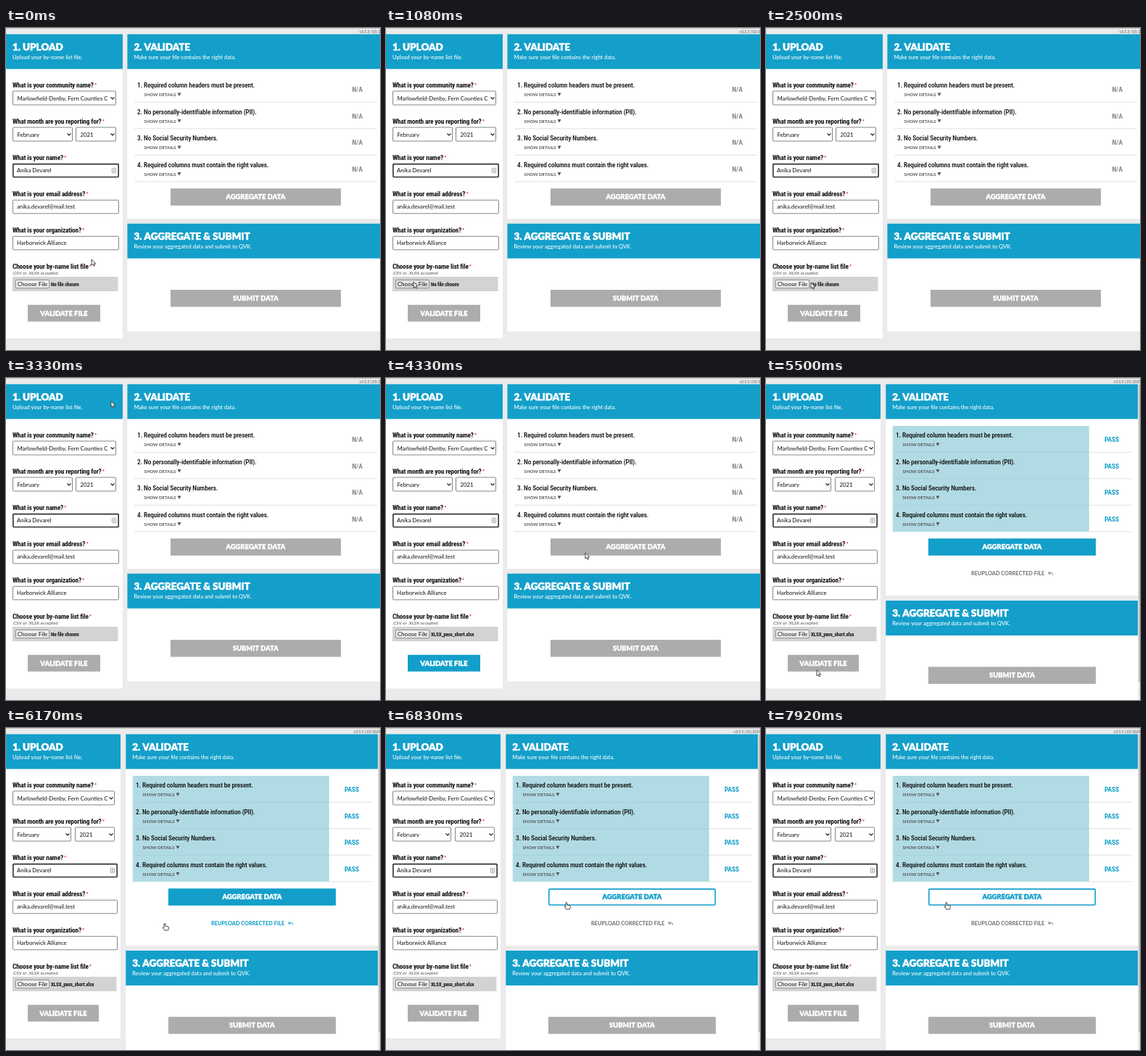
An HTML page with a canvas for the animation above (8000 ms loop, 516x444 px).

```html
<!DOCTYPE html>
<html lang="en">
<head>
<meta charset="utf-8">
<title>Upload and validate</title>
<style>
html, body { margin: 0; width: 516px; height: 444px; overflow: hidden; }
canvas { display: block; }
</style>
</head>
<body>
<canvas id="stage" width="516" height="444"></canvas>
<script>
const ctx = document.getElementById('stage').getContext('2d');
const LOOP = 8000, VALIDATED = 5500, FILE_CHOSEN = 4330, PRESSED = 5080;
const BLUE = '#139fca', GREY = '#abacae', INK = '#111', LINE = '#e0e0e0';
const SANS = 'Lato, sans-serif';
const NARROW = '"Roboto Condensed", "Open Sans Condensed", Roboto, sans-serif';

// Pointer path: time, x, y
const path = [
  [0, 118, 319], [80, 118, 319], [500, 38, 350], [1920, 38, 350],
  [2170, 62, 351], [2580, 62, 351], [3080, 153, 42], [3330, 145, 32],
  [3670, 145, 32], [4170, 275, 241], [4330, 275, 241], [5080, 70, 402.5],
  [5500, 70, 402.5], [6080, 218, 269], [6170, 218, 269], [6500, 248, 240], [LOOP, 248, 240]
];

function pointerAt(t) {
  const i = path.findIndex(key => key[0] > t);
  const [t0, x0, y0] = path[i - 1], [t1, x1, y1] = path[i];
  const p = (t - t0) / (t1 - t0), e = p * p * (3 - 2 * p);
  return { x: x0 + (x1 - x0) * e, y: y0 + (y1 - y0) * e };
}

function rect(x, y, w, h, fill) {
  ctx.fillStyle = fill;
  ctx.fillRect(x, y, w, h);
}

function box(x, y, w, h, stroke, width = 1, radius = 1, fill = '#fff') {
  ctx.beginPath();
  ctx.roundRect(x + width / 2, y + width / 2, w - width, h - width, radius);
  ctx.fillStyle = fill;
  ctx.fill();
  ctx.strokeStyle = stroke;
  ctx.lineWidth = width;
  ctx.stroke();
}

function text(str, x, y, size, { weight = 400, color = INK, family = SANS, align = 'left', spacing = 0 } = {}) {
  ctx.font = `${weight} condensed ${size}px ${family}`;
  ctx.letterSpacing = spacing + 'px';
  ctx.textAlign = align;
  ctx.fillStyle = color;
  ctx.fillText(str, x, y);
  if (weight === 900) { // a thin outline for the heaviest lettering
    ctx.strokeStyle = color;
    ctx.lineWidth = size * 0.04;
    ctx.strokeText(str, x, y);
  }
  return ctx.measureText(str).width;
}

function polyline(points, stroke, width) {
  ctx.beginPath();
  points.forEach(([x, y]) => ctx.lineTo(x, y));
  ctx.strokeStyle = stroke;
  ctx.lineWidth = width;
  ctx.stroke();
}

function panel(x, y, right, bottom, title, subtitle) {
  rect(x, y, right - x, bottom - y, '#fff');
  rect(x, y, right - x, 48, BLUE);
  text(title, x + 9, y + 22.3, 13.4, { weight: 900, color: '#fff' });
  text(subtitle, x + 9, y + 34, 7.5, { weight: 500, color: '#fff' });
}

function label(str, y) {
  const w = text(str, 9, y, 9.4, { weight: 700, family: NARROW, spacing: -0.18 });
  text('*', 10 + w, y, 8, { weight: 700, color: '#e0262d' });
}

function field(str, y, right, focused) {
  box(9, y, right - 9, 19.5, focused ? '#333' : '#858585', focused ? 1.6 : 1);
  text(str, 15, y + 12.5, 7.8);
}

function select(str, x, y, right) {
  box(x, y, right - x, 20, '#858585');
  text(str, x + 6.5, y + 13, 7.8);
  polyline([[right - 7.5, y + 9], [right - 5, y + 11.5], [right - 2.5, y + 9]], '#222', 1.2);
}

function button(str, x, y, w, h, color, outline) {
  if (outline) box(x, y, w, h, outline, 1.6, 1);
  else rect(x, y, w, h, color);
  text(str, x + w / 2, y + h / 2 + 3.4, 9.4, { weight: 900, color: outline ? BLUE : '#fff', align: 'center' });
}

function uploadPanel(t, done, mouse) {
  const shift = done ? -2 : 0;
  const chosen = t >= FILE_CHOSEN - 1;
  panel(0, 8.5, done ? 158 : 161, 428, '1. UPLOAD', 'Upload your by-name list file.');
  label('What is your community name?', 82);
  select('Marlowfield-Denby, Fern Counties C', 9, 86.5, 152 + shift);
  label('What month are you reporting for?', 132);
  select('February', 9, 136.5, 92 + shift);
  select('2021', 96 + shift / 2, 136.5, 152 + shift);
  label('What is your name?', 182);
  field('Anika Devarel', 186.8, 156 + shift, true);
  box(146 + shift, 193, 6, 7, '#888', 0.8);
  polyline([[148 + shift, 195.5], [150 + shift, 195.5]], '#777', 0.8);
  polyline([[148 + shift, 197.5], [150 + shift, 197.5]], '#777', 0.8);
  label('What is your email address?', 232);
  field('anika.devarel@mail.test', 236.8, 156 + shift);
  label('What is your organization?', 282);
  field('Harborwick Alliance', 286.8, 156 + shift);
  label('Choose your by-name list file', 332);
  text('.CSV or .XLSX accepted', 9, 340, 6, { weight: 700, color: '#777' });

  rect(9, 343, 145.5 + shift, 20, '#d3d3d3');
  const onPicker = mouse.x < 60 && mouse.x > 13 && mouse.y > 347 && mouse.y < 359;
  box(13, 347, 47, 12, '#767676', 0.8, 1.5, onPicker ? '#e2e2e2' : '#efefef');
  text('Choose File', 36.5, 355.7, 8.1, { align: 'center' });
  text(chosen ? 'XLSX_pass_short.xlsx' : 'No file chosen', 62, 355.5, 7, { weight: 700, family: NARROW, spacing: -0.12 });

  const active = chosen && !done;
  const over = mouse.x > 30 && mouse.x < 130 && mouse.y > 382 && mouse.y < 405;
  const outline = active && over && (t >= PRESSED ? '#17364f' : BLUE);
  button('VALIDATE FILE', 30, 381.7, 100 + shift, 23, active ? BLUE : GREY, outline);
}

function validatePanel(done, mouse) {
  const left = done ? 165.3 : 167.4, right = done ? 513 : 516, x = left + 9.5;
  panel(left, 8.5, right, done ? 300 : 263, '2. VALIDATE', 'Make sure your file contains the right data.');
  if (done) rect(x, 66, 271, 146, '#b1dbe4');
  [
    'Required column headers must be present.',
    'No personally-identifiable information (PII).',
    'No Social Security Numbers.',
    'Required columns must contain the right values.'
  ].forEach((rule, i) => {
    const y = 66 + i * 36.5;
    text(`${i + 1}. ${rule}`, x + 4.2, y + 16, 9.4, { weight: 500, family: NARROW, spacing: -0.17 });
    const w = text('SHOW DETAILS', x + 13.7, y + 28, 6, { weight: 700, color: '#555' });
    const tip = x + 15.7 + w;
    ctx.beginPath();
    ctx.moveTo(tip, y + 23.5);
    ctx.lineTo(tip + 5, y + 23.5);
    ctx.lineTo(tip + 2.5, y + 28);
    ctx.fill();
    text(done ? 'PASS' : 'N/A', done ? 477 : 484.8, y + 22, 9.4,
      { weight: 700, color: done ? BLUE : '#858585', family: NARROW, align: 'center' });
    const edge = done ? x + 271 : x;
    rect(edge, y + 35.8, (done ? 505 : 512) - edge, 1, LINE);
    if (done && i < 3) rect(x, y + 35.8, 271, 1, '#a6d0da');
  });

  const bx = done ? 224 : 227, bw = done ? 231 : 235;
  const over = done && mouse.x > bx && mouse.y > 221 && mouse.y < 245;
  button('AGGREGATE DATA', bx, 221.3, bw, 23.5, done ? BLUE : GREY, over && BLUE);
  if (!done) return;

  const onLink = mouse.x > 215 && mouse.y > 260 && mouse.y < 280;
  const color = onLink ? BLUE : '#777';
  text('REUPLOAD CORRECTED FILE', 283, 272, 7.4, { weight: 800, color });
  ctx.beginPath();
  ctx.moveTo(390, 269.5);
  ctx.quadraticCurveTo(395, 266, 395.5, 271.5);
  ctx.strokeStyle = color;
  ctx.lineWidth = 1;
  ctx.stroke();
  polyline([[390.5, 267], [390, 269.8], [393, 270]], color, 1);
}

function submitPanel(done) {
  const y = done ? 307 : 269.7;
  panel(done ? 165.3 : 167.4, y, done ? 513 : 516, done ? 444 : 418.5,
    '3. AGGREGATE & SUBMIT', 'Review your aggregated data and submit to QVK.');
  button('SUBMIT DATA', done ? 224 : 227, y + 91.3, done ? 231 : 235, 23.5, GREY);
}

const arrow = new Path2D('M0 0V8.2L1.9 6.5L3.2 9.3L4.6 8.7L3.4 6H5.8Z');
const hand = new Path2D('M0 1Q.9 -.4 1.8 1V4L6 5Q6.7 5.3 6.5 6.3L5.7 10H.9L-1.9 6.5Q-1.7 5 0 6.3Z');

function pointer({ x, y }, isHand) {
  const shape = isHand ? hand : arrow;
  ctx.save();
  ctx.translate(x, y);
  ctx.fillStyle = '#fff';
  ctx.strokeStyle = '#333';
  ctx.lineWidth = 0.9;
  ctx.fill(shape);
  ctx.stroke(shape);
  ctx.restore();
}

function draw(now) {
  const t = Math.floor(now % LOOP * 0.012 + 0.05) / 0.012 % LOOP;
  const done = t >= VALIDATED - 1;
  const mouse = pointerAt(t);
  rect(0, 0, 516, 444, '#ebebeb');
  rect(0, 0, 516, 1, '#c4c4c4');
  text('v3.3.3 | 03/2021', done ? 479.5 : 487.5, 7, 5.1, { color: '#555' });
  uploadPanel(t, done, mouse);
  validatePanel(done, mouse);
  submitPanel(done);
  if (done) rect(514, 9, 2, 410, '#c1c1c1');
  pointer(mouse, done && mouse.x > 215);
  requestAnimationFrame(() => draw(performance.now()));
}
draw(performance.now());
</script>
</body>
</html>
```
